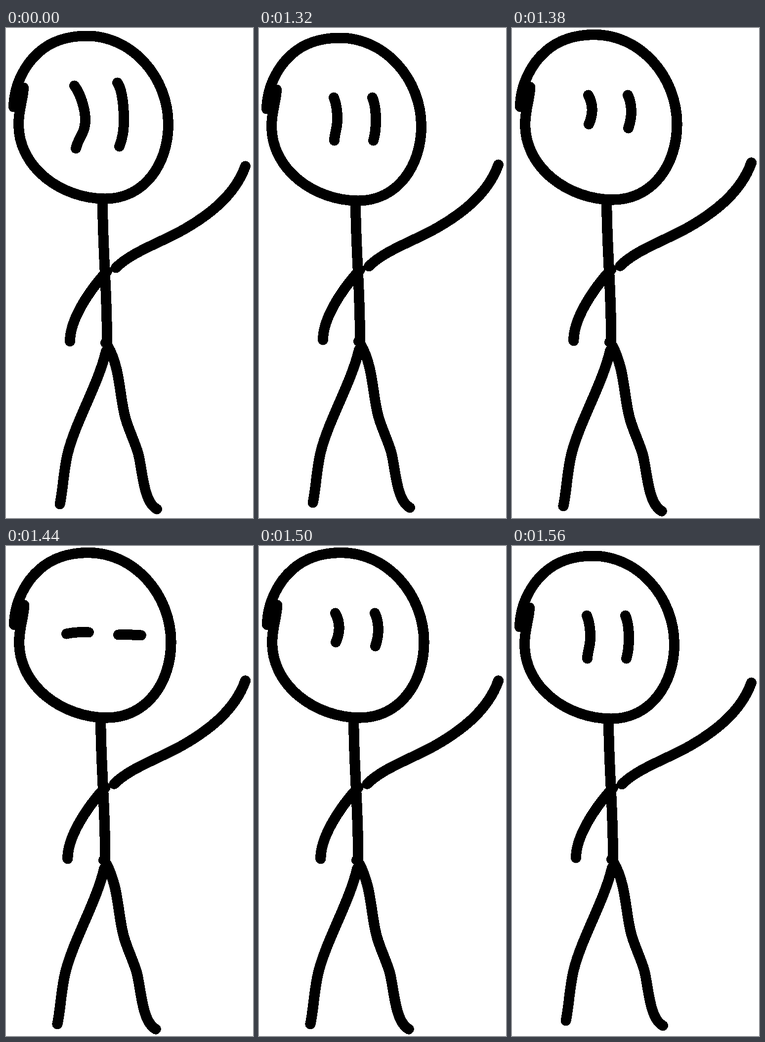
An HTML page for the animation above (1.62 s loop, 500 px wide and 993 px high).

```html
<!DOCTYPE html>
<html lang="en">
<head>
<meta charset="utf-8">
<title>Blinking stick figure</title>
<style>
  html, body { margin: 0; width: 100%; height: 100%; overflow: hidden; background: #fff; }
  svg { display: block; width: 500px; height: 993px; }
  path { fill: none; stroke: #000; stroke-width: 21; stroke-linecap: round; stroke-linejoin: round; shape-rendering: crispEdges; }
</style>
</head>
<body>
<svg viewBox="-0.5 0 500 993">
  <path id="head" d="M35 121C34 145 25 165 25 195C25 284 113 346 200 346C280 346 328 275 328 195C328 100 255 16 163 16C125 16 90 27 65 50C40 72 16 112 15 160L28 142"/>
  <g id="body">
    <path d="M195 353C195 390 199 480 200 500C202 540 204 600 204 638H201"/>
    <path d="M204 493C170 530 129 589 129 635"/>
    <path d="M222 486C252 455 310 436 360 408C405 382 462 342 484 280"/>
    <path d="M202 655C187 720 141 797 125 860C116 895 115 935 108.5 965"/>
    <path d="M206 645C232 692 229 750 242 793C249 817 260 838 267 862C276 895 277 960 305 975"/>
  </g>
  <path id="eyes"/>
</svg>
<script>
const [head, body, eyes] = ["head", "body", "eyes"].map(id => document.getElementById(id));

const poses = {
  rest: { head: [1, 0, 0, 1, 0, 0], body: [1, 0, 0, 1, 0, 0] },
  dip: { head: [1, 0, 0, 1, 0, 4], body: [1, 0, 0, 1, 0, -3] },
  stretch: { head: [1.0144, 0, 0, 1.0136, 0.8, -2.7], body: [1.0135, 0, 0, 1.0158, -6.5, -11.4] }
};

const looks = {
  open: "M138 117C150 133 160 163 160 187C160 213 146 222 141 244M225 111C235 125 238 160 238 185C238 207 236 222 229 240",
  half: "M151 141C157 155 158 170 158 185C158 205 152 215 152 228M229 141C235 155 236 170 236 187C236 205 234 218 231 228",
  low: "M154 136C164 155 164 175 155 195M234 136C243 155 243 180 235 203",
  shut: "M122 178C135 175 150 174 167 175M227 180C240 179 258 180 273 181"
};

// One blink: a long rest, then five quick steps.
const REST = 1320, STEP = 60;
const blink = [
  ["dip", "half"],
  ["stretch", "low"],
  ["stretch", "shut"],
  ["stretch", "low"],
  ["dip", "half"]
];
const LOOP = REST + STEP * blink.length;

function draw(now) {
  const t = now % LOOP;
  const [pose, look] = t < REST ? ["rest", "open"] : blink[Math.floor((t - REST) / STEP)];
  head.setAttribute("transform", `matrix(${poses[pose].head})`);
  body.setAttribute("transform", `matrix(${poses[pose].body})`);
  eyes.setAttribute("d", looks[look]);
}

const start = performance.now();
function tick() {
  draw(performance.now() - start);
  requestAnimationFrame(tick);
}
tick();
</script>
</body>
</html>
```
